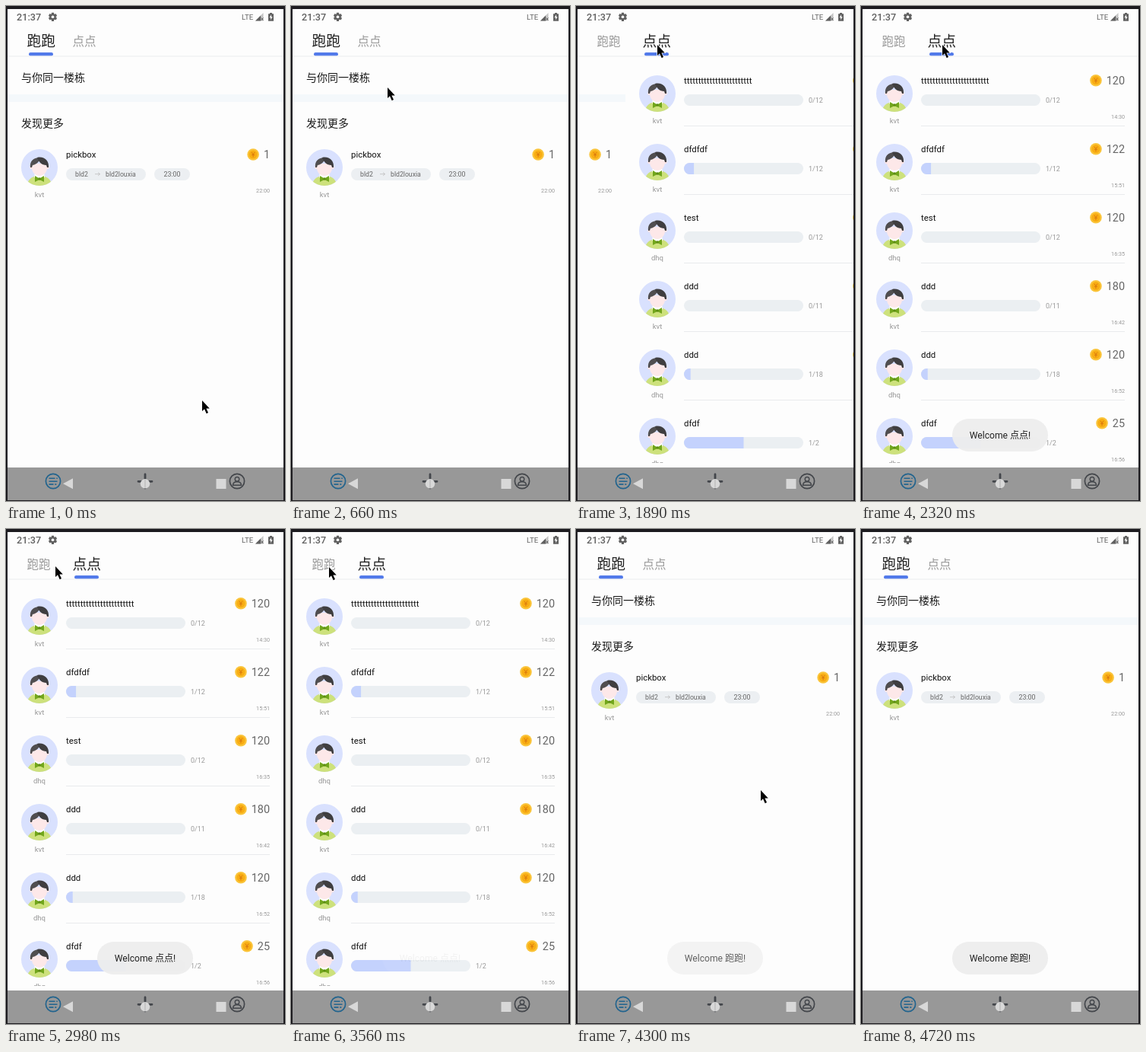
An HTML page with a canvas for the animation above (5 s loop, 367 by 650 pixels).

```html
<!DOCTYPE html>
<html lang="zh">
<head>
<meta charset="utf-8">
<style>
html, body { margin: 0; width: 100%; height: 100%; overflow: hidden; background: #1c1b1f; }
canvas { display: block; width: 367px; height: 650px; }
</style>
</head>
<body>
<canvas id="stage"></canvas>
<script>
const W = 367, H = 650, LOOP = 5000, PAGE = 363, RIGHT = 347;
const FONT = 'Roboto, "Noto Sans CJK SC", "Noto Sans CJK", sans-serif';
const canvas = document.getElementById('stage');
const dpr = window.devicePixelRatio || 1;
canvas.width = W * dpr;
canvas.height = H * dpr;
const c = canvas.getContext('2d');

// title, done, total, reward, owner, time
const tasks = [
  ['t'.repeat(24), 0, 12, 120, 'kvt', '14:30'],
  ['dfdfdf', 1, 12, 122, 'kvt', '15:51'],
  ['test', 0, 12, 120, 'dhq', '16:35'],
  ['ddd', 0, 11, 180, 'kvt', '16:42'],
  ['ddd', 1, 18, 120, 'dhq', '16:52'],
  ['dfdf', 1, 2, 25, 'dhq', '16:56']
];

// time, x, y of the pointer tip
const pointer = [
  [30, 258, 518], [240, 272, 512], [380, 272, 512], [480, 253, 455],
  [560, 206, 330], [660, 127, 108], [740, 112, 66], [850, 108, 52],
  [930, 100, 43], [1020, 103, 46], [1110, 107, 51], [2750, 107, 51],
  [2900, 78, 49], [3070, 50, 50], [3980, 50, 50], [4100, 88, 110],
  [4250, 220, 300], [4400, 289, 425], [4560, 315, 560], [4700, 360, 655]
];

const clamp = v => Math.max(0, Math.min(1, v));
const ramp = (t, a, b) => clamp((t - a) / (b - a));

function text(s, x, y, size, color, align = 'left', weight = 400) {
  c.font = `${weight} ${size}px ${FONT}`;
  c.textAlign = align;
  c.fillStyle = color;
  c.fillText(s, x, y);
  return c.measureText(s).width;
}

function rect(x, y, w, h, color) {
  c.fillStyle = color;
  c.fillRect(x, y, w, h);
}

function pill(x, y, w, h, color) {
  c.beginPath();
  c.roundRect(x, y, w, h, h / 2);
  c.fillStyle = color;
  c.fill();
}

function disc(x, y, r, color) {
  c.beginPath();
  c.arc(x, y, r, 0, 7);
  c.fillStyle = color;
  c.fill();
}

function shape(d, color) {
  c.fillStyle = color;
  c.fill(new Path2D(d));
}

function line(d, color, width) {
  c.strokeStyle = color;
  c.lineWidth = width;
  c.stroke(new Path2D(d));
}

function at(x, y, draw) {
  c.save();
  c.translate(x, y);
  draw();
  c.restore();
}

function avatar(x, y) {
  at(x, y, () => {
    disc(0, 0, 24, '#d9e1fe');
    c.clip();
    shape('M-17 25C-15 14 -9 11 0 11S15 14 17 25Z', '#cde17c');
    shape('M-6 7H6L7 13L0 16L-7 13Z', '#fff');
    disc(-10.5, 0, 2.2, '#fbe3e5');
    disc(10.5, 0, 2.2, '#fbe3e5');
    shape('M-10 -5H10V0C10 7 5 11 0 11S-10 7 -10 0Z', '#fde8e9');
    shape('M-12 0C-13 -8 -8 -13 0 -13C1 -9 -3 -4 -9 -3L-10 0Z', '#504e50');
    shape('M-3 -13C6 -15 13 -9 12 0H10L9 -3C3 -3 -1 -7 -3 -13Z', '#3f3e40');
    shape('M0 14.5L-6 11V19L0 16L6 19V11Z', '#72a61c');
    disc(0, 15, 1.7, '#5d8d14');
  });
}

function reward(n, y) {
  const x = RIGHT - text(n, RIGHT, y + 5.3, 14.4, '#666', 'right') - 13.8;
  disc(x, y, 7.8, '#fac43a');
  disc(x, y, 5.6, '#f8ad13');
  line(`M${x - 2} ${y - 3}l2 3l2 -3M${x} ${y}v3.5M${x - 2} ${y + .6}h4`, '#d9790f', 1);
}

function person(name, y) {
  avatar(44, y);
  text(name, 44, y + 38.5, 9.6, '#999', 'center');
}

function runPage() {
  text('与你同一楼栋', 20, 98.8, 14, '#1a1a1a');
  rect(2, 116, PAGE, 10, '#f4f8fb');
  text('发现更多', 20, 158.8, 14, '#1a1a1a');
  person('kvt', 212);
  text('pickbox', 79, 199, 11.4, '#111');
  pill(79, 213, 105, 16, '#eceff2');
  text('bld2', 91, 224.2, 8.7, '#666');
  line('M117 220.7h6.5M121.2 218.6l2.3 2.1l-2.3 2.1', '#bbb', .8);
  text('bld2louxia', 131, 224.2, 8.7, '#666');
  pill(195, 213, 47, 16, '#eceff2');
  text('23:00', 218.5, 224.2, 8.9, '#666', 'center');
  reward(1, 195);
  text('22:00', RIGHT, 245, 7.2, '#999', 'right');
}

function taskRow([title, done, total, coins, owner, time], i) {
  at(0, i * 90, () => {
    person(owner, 115);
    text(title, 79, 101.5, 11.4, '#111');
    c.save();
    pill(79, 116, 157, 15, '#ebeff2');
    c.clip();
    rect(79, 116, 157 * done / total, 15, '#c4d2fd');
    c.restore();
    text(`${done}/${total}`, 243, 126.8, 9, '#999');
    reward(coins, 97.7);
    text(time, RIGHT, 148, 7.2, '#999', 'right');
    rect(79, 157, 268, 1, '#e9ebed');
  });
}

function pageOffset(t) {
  if (t < 1490 || t >= 3870) return 0;
  if (t < 1890) return 82;
  if (t < 1950) return 300;
  return t < 3680 ? PAGE : 281;
}

function pages(t) {
  const shift = pageOffset(t);
  c.save();
  c.beginPath();
  c.rect(2, 67, PAGE, 533);
  c.clip();
  if (shift < PAGE) at(-shift, 0, runPage);
  if (shift > 0) at(PAGE - shift, 0, () => tasks.forEach(taskRow));
  c.restore();
}

function statusBar() {
  text('21:37', 14, 19, 12.7, '#616161', 'left', 500);
  at(61.5, 14.3, () => {
    for (let i = 0; i < 6; i++) {
      c.rotate(Math.PI / 3);
      rect(-1.6, -5.6, 3.2, 4, '#616161');
    }
    c.beginPath();
    c.arc(0, 0, 3.1, 0, 7);
    c.strokeStyle = '#616161';
    c.lineWidth = 2.4;
    c.stroke();
    disc(0, 0, 1.8, '#fdfdfd');
  });
  text('LTE', 310, 18, 9.7, '#616161');
  shape('M328 19.5L338.5 9V19.5Z', '#c4c4c4');
  shape('M328 19.5L335 12.5V19.5Z', '#616161');
  line('M335.5 15.5l3 3.5m0 -3.5l-3 3.5', '#616161', 1);
  shape('M345 10.2H347V9H350V10.2H352V19.7H345Z', '#616161');
  shape('M349 11.3L346.5 15.2H348.2V18.2L350.6 14.2H349Z', '#fdfdfd');
}

function tabs(second) {
  ['跑跑', '点点'].forEach((label, i) => {
    const on = second === (i === 1), size = on ? 18.8 : 15.5;
    text(label, 27.5 + i * 60, on ? 53 : 51.9, size, on ? '#222' : '#999');
  });
  pill(second ? 90 : 30, 61, 32, 4.4, '#527aea');
  rect(2, 65.5, PAGE, 1, '#ebedf0');
}

function ring(x, color) {
  c.beginPath();
  c.arc(x, 624, 9.6, 0, 7);
  c.strokeStyle = color;
  c.lineWidth = 1.7;
  c.stroke();
}

function navBar() {
  rect(2, 606, PAGE, 43, '#989898');
  ring(62, '#22648e');
  line('M56.5 620.3h8M66.3 620.3h1.5M56.5 624.2h11M56.5 628.1h6M64.3 628.1h2', '#22648e', 1.6);
  shape('M75 627.3L88 620.3V634.3Z', '#d8d8d8');
  c.lineCap = 'round';
  line('M183 615v18M174 624.3h18', '#43464b', 2.8);
  c.lineCap = 'butt';
  disc(183, 627.3, 6.2, '#d8d8d8');
  line('M183 621.5v11', '#bdbdbd', 1.4);
  rect(276.5, 621, 13, 13, '#d8d8d8');
  ring(304, '#43464b');
  line('M298.5 629.2C298.5 625.5 301 624.7 304 624.7S309.5 625.5 309.5 629.2Z', '#43464b', 1.4);
  line('M301.2 621.3a2.8 2.8 0 1 1 5.6 0a2.8 2.8 0 1 1 -5.6 0', '#43464b', 1.4);
}

function toast(label, alpha) {
  if (alpha <= 0) return;
  c.globalAlpha = alpha * .95;
  pill(120, 542, 126, 43, '#eee');
  c.globalAlpha = alpha;
  text(`Welcome ${label}!`, 183, 568, 12.1, '#222', 'center');
  c.globalAlpha = 1;
}

function cursor(t) {
  if (t >= 4700) return;
  let [, x, y] = pointer[0];
  const i = pointer.findIndex(p => p[0] > t);
  if (i > 0) {
    const [t0, x0, y0] = pointer[i - 1], [t1, x1, y1] = pointer[i];
    const k = ramp(t, t0, t1);
    x = x0 + (x1 - x0) * k;
    y = y0 + (y1 - y0) * k;
  }
  at(Math.round(x), Math.round(y), () => {
    const arrow = 'M0 0V14L3 11.3L5.7 17.2L8 16.1L5.4 10.4H9.8Z';
    line(arrow, '#fff', 1.4);
    shape(arrow, '#000');
  });
}

function draw(t) {
  c.setTransform(dpr, 0, 0, dpr, 0, 0);
  rect(0, 0, W, H, '#1c1b1f');
  rect(2, 4, PAGE, 645, '#fdfdfd');
  statusBar();
  tabs(t >= 1490 && t < 3680);
  pages(t);
  navBar();
  toast('点点', ramp(t, 2060, 2320) * (1 - ramp(t, 3200, 3580)));
  toast('跑跑', ramp(t, 4120, 4380));
  cursor(t);
}

const start = performance.now();
function tick() {
  draw((performance.now() - start) % LOOP);
  requestAnimationFrame(tick);
}
tick();
</script>
</body>
</html>
```
